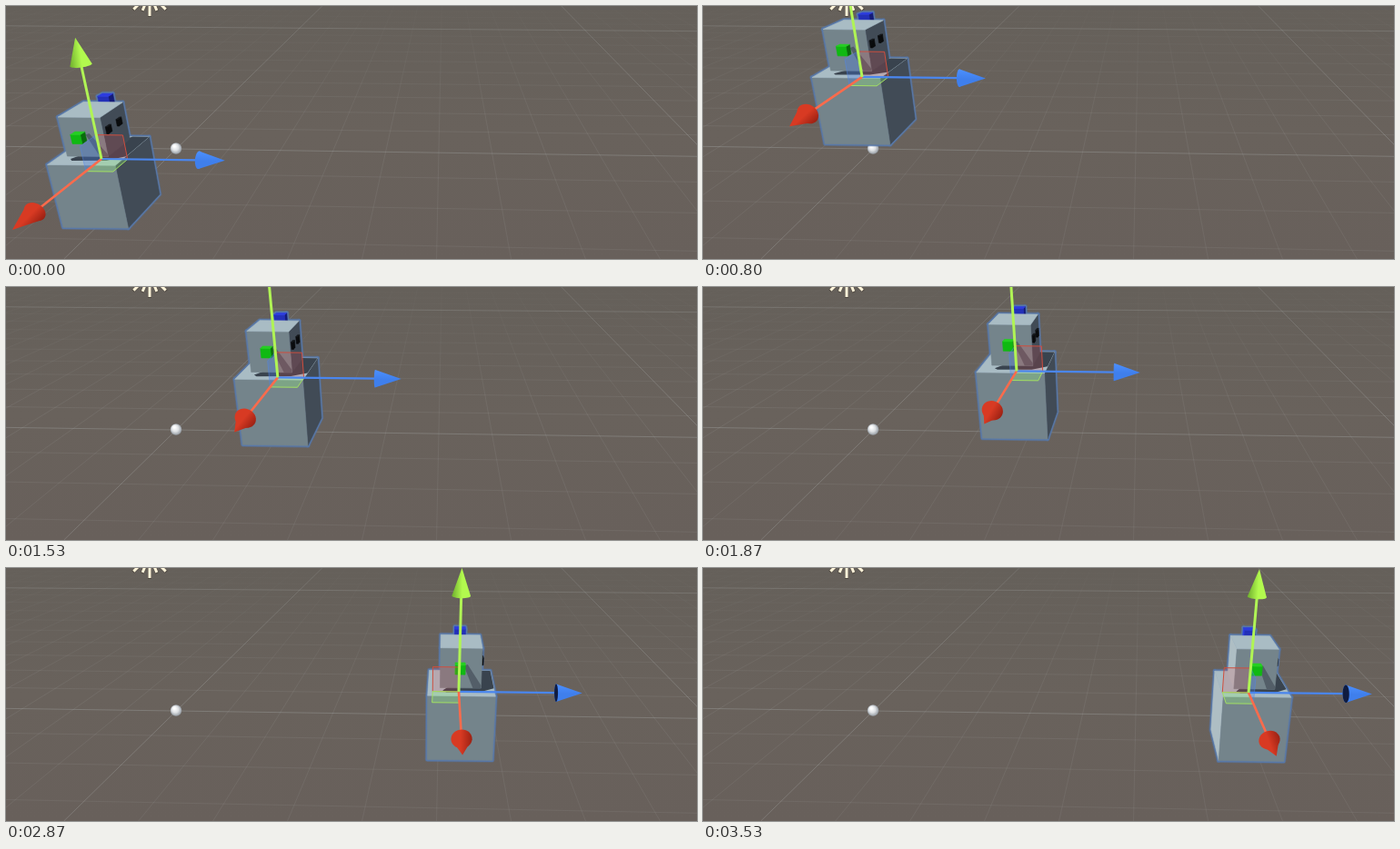
An HTML page with a canvas that plays this animation: 760x278 px, repeating every 3590 ms.

```html
<!DOCTYPE html>
<html lang="en">
<head>
<meta charset="utf-8">
<title>Hopping robot in a scene view</title>
<style>
  html, body { margin: 0; width: 100%; height: 100%; overflow: hidden; background: #68615b; }
  canvas { display: block; }
</style>
</head>
<body>
<canvas id="stage" width="760" height="278"></canvas>
<script>
const ctx = document.getElementById('stage').getContext('2d');
const W = 760, H = 278, LOOP = 3590, STEP = 200 / 3;

// Perspective: vanishing points of the red and green axes, scale per unit.
const VR = [482, -131.4], VG = [455, 1780];
const UNIT = 77.6, KR = 0.118, KG = 0.0436;
const AXIS = 1.75, CONE = 1.38, CONE_R = 0.125;

const GROUND = 171.5, HALF_G = 400;
const hops = [[0.262, 1.235], [1.26, 2.193], [2.308, 3.026], [3.03, 3.705]];
const path = [[400, 111], [600, 137], [800, 175], [1133, 238], [1600, 309], [1867, 345],
  [2133, 384.5], [2400, 427], [2867, 498], [3200, 551], [3533, 600]];

const SHELL = { top: '#a9bcc4', front: '#74848b', right: '#414b56', left: '#aebec4' };
const GREEN = { top: '#25cf22', front: '#10b912', right: '#0a6c0c', left: '#25cf22' };
const BLUE = { top: '#2c3ce0', front: '#2330b8', right: '#151c78', left: '#2c3ce0' };
const BLACK = { top: '#15181b', front: '#0a0b0d', right: '#0a0b0d', left: '#0a0b0d' };

// Bounds as b0, b1 (blue axis), g0, g1 (green axis), r0, r1 (red axis).
const body = [-0.43, 0.475, -0.825, 0.14, -0.455, 0.46];
const head = [-0.265, 0.29, 0.18, 0.75, -0.275, 0.285];
const ear = [-0.065, 0.065, 0.425, 0.555, 0.31, 0.41];
const knob = [-0.065, 0.085, 0.68, 0.825, -0.42, -0.3];
const eyes = [0.17, -0.09].map(r => [0.29, 0.315, 0.485, 0.585, r - 0.045, r + 0.045]);

let origin = [0, 0];

function at(b, g, r) {
  const kr = r * KR, kg = g * KG, w = 1 - kr - kg;
  return [
    (origin[0] + b * UNIT - kr * VR[0] - kg * VG[0]) / w,
    (origin[1] + b * UNIT * 0.012 - kr * VR[1] - kg * VG[1]) / w
  ];
}

function trace(pts) {
  ctx.beginPath();
  pts.forEach(p => ctx.lineTo(p[0], p[1]));
  ctx.closePath();
}

function fill(pts, color) {
  trace(pts);
  ctx.fillStyle = color;
  ctx.fill();
}

function line(a, b, color, width) {
  ctx.beginPath();
  ctx.moveTo(a[0], a[1]);
  ctx.lineTo(b[0], b[1]);
  ctx.strokeStyle = color;
  ctx.lineWidth = width;
  ctx.stroke();
}

function facesCamera(pts) {
  let area = 0;
  pts.forEach((p, i) => {
    const q = pts[(i + 1) % pts.length];
    area += p[0] * q[1] - q[0] * p[1];
  });
  return area < 0;
}

function faces([b0, b1, g0, g1, r0, r1]) {
  const quads = {
    left: [[b0, g0, r0], [b0, g0, r1], [b0, g1, r1], [b0, g1, r0]],
    right: [[b1, g0, r1], [b1, g0, r0], [b1, g1, r0], [b1, g1, r1]],
    front: [[b0, g0, r1], [b1, g0, r1], [b1, g1, r1], [b0, g1, r1]],
    top: [[b0, g1, r1], [b1, g1, r1], [b1, g1, r0], [b0, g1, r0]]
  };
  return Object.entries(quads)
    .map(([side, quad]) => [side, quad.map(p => at(...p))])
    .filter(([, pts]) => facesCamera(pts));
}

function drawBox(box, colors) {
  for (const [side, pts] of faces(box)) {
    fill(pts, colors[side]);
    ctx.strokeStyle = colors[side];
    ctx.lineWidth = 0.6;
    ctx.stroke();
  }
}

function drawOutline() {
  ctx.lineJoin = 'round';
  for (const [width, color] of [[5, 'rgba(84,118,168,.4)'], [3.4, '#5878a8']]) {
    for (const box of [body, head, knob]) {
      for (const [, pts] of faces(box)) {
        trace(pts);
        ctx.lineWidth = width;
        ctx.strokeStyle = color;
        ctx.stroke();
      }
    }
  }
}

function drawRobot() {
  drawOutline();
  drawBox(body, SHELL);
  const shade = [[-0.23, 0.285], [-0.18, 0.34], [0.28, 0.32], [0.475, 0.19], [0.475, -0.455], [0.23, -0.455]];
  fill(shade.map(([b, r]) => at(b, body[3], r)), '#39434e');
  drawBox(knob, BLUE);
  const eyesInFront = faces(head).some(([side]) => side === 'right');
  const drawEyes = () => [...eyes].reverse().forEach(e => drawBox(e, BLACK));
  if (!eyesInFront) drawEyes();
  drawBox(head, SHELL);
  const streak = [[0.05, 0.5], [0.1, 0.52], [0.29, 0.22], [0.29, 0.18], [0.18, 0.18]];
  fill(streak.map(([b, g]) => at(b, g, head[5])), '#535e68');
  if (eyesInFront) drawEyes();
  drawBox(ear, GREEN);
}

function drawBackground() {
  const sky = ctx.createLinearGradient(0, 0, 0, H);
  sky.addColorStop(0, '#65605a');
  sky.addColorStop(0.5, '#69625c');
  sky.addColorStop(1, '#68605b');
  ctx.fillStyle = sky;
  ctx.fillRect(0, 0, W, H);

  const fade = (alpha, far) => {
    const g = ctx.createLinearGradient(0, 0, 0, H);
    g.addColorStop(0, `rgba(190,195,195,${alpha * far})`);
    g.addColorStop(0.5, `rgba(190,195,195,${alpha})`);
    g.addColorStop(1, `rgba(190,195,195,${alpha * 0.9})`);
    return g;
  };
  const minor = fade(0.1, 0.1), major = fade(0.26, 0.6);
  for (let k = -16; k <= 26; k++) {
    const slope = -1.0217 + 0.2002 * k;
    const big = k === 0 || k === 10;
    line([VR[0] - slope * VR[1], 0], [VR[0] + slope * (H - VR[1]), H], big ? major : minor, 1);
  }
  for (let k = -4; k <= 13; k++) {
    const d = 1 / (0.003467 + 0.0003 * k);
    const y = d + VR[1], tilt = d * 0.00005;
    const big = k === 0 || k === 10;
    const color = big ? `rgba(190,195,195,${k ? 0.2 : 0.26})` : minor;
    line([0, y - 187 * tilt], [W, y + (W - 187) * tilt], color, 1);
  }
}

function drawBall() {
  const g = ctx.createRadialGradient(185, 154, 1, 187, 156.5, 6.5);
  g.addColorStop(0, '#ffffff');
  g.addColorStop(0.5, '#dcdfe2');
  g.addColorStop(1, '#8e959c');
  ctx.fillStyle = g;
  ctx.beginPath();
  ctx.arc(187, 156.5, 6.2, 0, 7);
  ctx.fill();
}

// Long and short rays alternate around a centre above the stage.
function drawSun() {
  for (const [color, grow] of [['rgba(60,54,46,.5)', 1], ['#fff4da', 0]]) {
    for (let k = -2; k <= 2; k++) {
      const a = k * Math.PI / 8, s = Math.sin(a), c = Math.cos(a);
      const end = (k % 2 ? 20.5 : 25) + grow;
      line([158 + 13 * s, -14 + 13 * c], [158 + end * s, -14 + end * c], color, 3 + grow);
    }
  }
}

// Cone along an axis; ring(u, v) gives a point on its base plane.
function drawCone(tip, ring, light, dark, disc) {
  const base = [];
  for (let i = 0; i < 32; i++) {
    const a = i * Math.PI / 16;
    base.push(ring(Math.cos(a) * CONE_R, Math.sin(a) * CONE_R));
  }
  const mid = ring(0, 0);
  const dx = tip[0] - mid[0], dy = tip[1] - mid[1];
  const side = p => (p[0] - mid[0]) * dy - (p[1] - mid[1]) * dx;
  const sorted = [...base].sort((p, q) => side(p) - side(q));
  const a = sorted[0], b = sorted[31];
  const shade = ctx.createLinearGradient(a[0], a[1], b[0], b[1]);
  shade.addColorStop(0, light);
  shade.addColorStop(0.45, light);
  shade.addColorStop(1, dark);
  fill(base, shade);
  fill([tip, a, b], shade);
  if (disc) fill(base, disc);
}

function drawPlane(pts, color, edge) {
  fill(pts, color);
  ctx.strokeStyle = edge;
  ctx.lineWidth = 1;
  ctx.stroke();
}

function drawGizmo() {
  const q = 0.37, s = origin[0] > 470 ? -q : q;
  const o = at(0, 0, 0);
  drawPlane([o, at(0, 0, q), at(0, q, q), at(0, q, 0)], 'rgba(70,125,235,.3)', 'rgba(80,135,240,.45)');
  drawPlane([o, at(s, 0, 0), at(s, q, 0), at(0, q, 0)], 'rgba(255,70,70,.16)', '#cf4e3e');
  drawPlane([o, at(s, 0, 0), at(s, 0, q), at(0, 0, q)], 'rgba(150,255,120,.26)', '#a3e063');

  line(o, at(CONE, 0, 0), '#4a86ee', 2.2);
  const behind = at(CONE, 0, 0)[0] > VR[0];
  drawCone(at(AXIS, 0, 0), (u, v) => at(CONE, u, v), '#3f7fec', '#4c90ff', behind && '#101c40');

  line(o, at(0, 0, CONE), '#fb6b4c', 2.6);
  line(o, at(0, CONE, 0), '#b0f455', 3);
  drawCone(at(0, AXIS, 0), (u, v) => at(u, CONE, v), '#b2fa4e', '#6fae2e');
  drawCone(at(0, 0, AXIS), (u, v) => at(u, v, CONE), '#d83a23', '#9c2113');
}

function place(n) {
  if (n < 6) return [105, 168];
  if (n < 9) return [111, 170];
  const ms = n * STEP, sec = ms / 1000;
  let i = 1;
  while (i < path.length - 1 && path[i][0] < ms) i++;
  const [t0, x0] = path[i - 1], [t1, x1] = path[i];
  const x = x0 + (x1 - x0) * Math.min(1, (ms - t0) / (t1 - t0));
  const hop = hops.find(([a, b]) => sec >= a && sec <= b);
  const lift = hop ? HALF_G * (sec - hop[0]) * (hop[1] - sec) : 0;
  return [x, GROUND - lift];
}

function draw() {
  const t = performance.now() % LOOP;
  origin = place(Math.min(53, Math.floor((t + 5) / STEP)));
  drawBackground();
  drawBall();
  drawRobot();
  drawSun();
  drawGizmo();
  requestAnimationFrame(draw);
}
draw();
</script>
</body>
</html>
```
